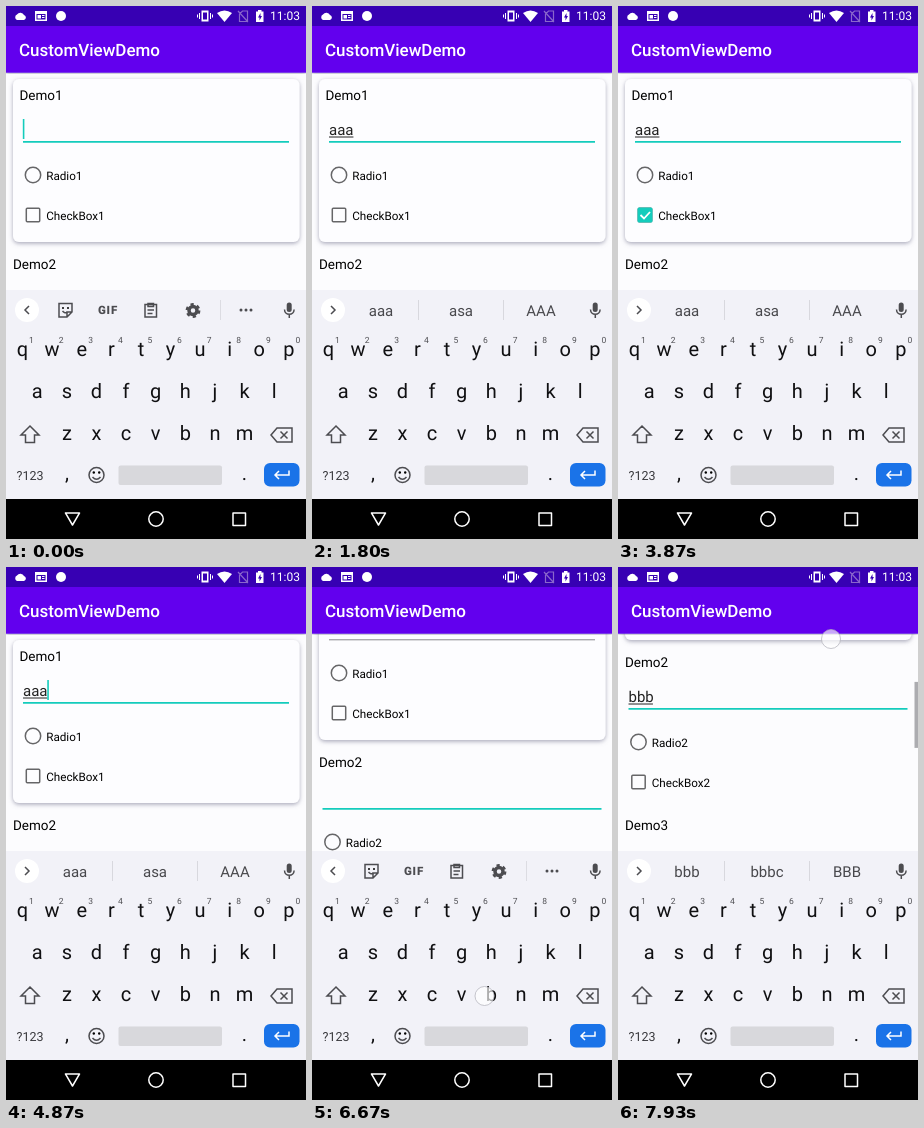
Recreate the animation shown at these times as an HTML page. Size 300 px wide and 533 px high, loop 8000 ms.

```html
<!DOCTYPE html>
<html lang="en">
<head>
<meta charset="utf-8">
<title>CustomViewDemo</title>
<style>
html, body { margin: 0; height: 100%; overflow: hidden; background: #fcfcfe; }
svg { display: block; width: 100vw; height: 100vh; font-family: Roboto, sans-serif; text-rendering: geometricPrecision; }
.mid { text-anchor: middle; }
.line { fill: none; stroke: #4c4c50; stroke-width: 1.5; }
.box { fill: none; stroke: #666668; stroke-width: 1.5; }
.nav { fill: none; stroke: #fff; stroke-width: 1.5; stroke-linejoin: round; }
.word { font-size: 15px; fill: #48484c; text-anchor: middle; }
.digit { font-size: 8.5px; fill: #505054; text-anchor: middle; }
.key { font-size: 20px; fill: #101012; text-anchor: middle; }
</style>
</head>
<body>
<svg viewBox="0 0 300 533">
  <defs>
    <filter id="shade" x="-10%" y="-10%" width="120%" height="125%">
      <feDropShadow dx="0" dy="1.5" stdDeviation="2.2" flood-color="#70708c" flood-opacity=".6"/>
    </filter>
  </defs>
  <rect width="300" height="533" fill="#fcfcfe"/>
  <g id="page"></g>

  <g id="bar">
    <rect y="62" width="300" height="4.5" fill="#6200ee" filter="url(#shade)"/>
    <rect y="20" width="300" height="46.5" fill="#6200ee"/>
    <rect width="300" height="20" fill="#3700b3"/>
    <text x="13" y="50" font-size="17" font-weight="500" fill="#fff">CustomViewDemo</text>
    <g fill="#fff">
      <path d="M11 14a3 3 0 0 1 0-5.500a4 4 0 0 1 7 .5a2.600 2.600 0 0 1 0 5z"/>
      <path fill-rule="evenodd" d="M29 5h12v10H29zM30.500 8v5.500h9V8zM31.500 9h3.500v3.500h-3.500zM36 9h2.500v1H36zM36 11h2.500v1H36z"/>
      <circle cx="55" cy="10" r="5"/>
      <path fill-rule="evenodd" d="M195.500 4.500h7v11h-7zM197 6.500v7h4v-7zM193 7h1v6h-1zM204 7h1v6h-1zM191 8.500h1v3h-1zM206 8.500h1v3h-1z"/>
      <path d="M211 7q7.500-5 15 0l-7.500 9z"/>
      <path d="M250 5.500h2V4h3.500v1.500h2V16h-7.500zM254.500 7l-2.500 4.500h1.500V14.500l2.500-4.500h-1.500z" fill-rule="evenodd"/>
    </g>
    <path d="M233.500 15.500V8l3-3h5v10.500zM232 5l10 11" fill="none" stroke="#8a66cc" stroke-width="1.200"/>
    <text x="264" y="14.300" font-size="12" fill="#fff">11:03</text>
  </g>

  <g id="keys"></g>
  <g id="strip"></g>
  <g id="popup"></g>
  <g>
    <rect y="493" width="300" height="40"/>
    <g class="nav">
      <path d="M59.500 507h14l-7 12z"/>
      <circle cx="150" cy="513" r="7.200"/>
      <rect x="227" y="507" width="12.500" height="12.500"/>
    </g>
  </g>
  <g id="touch"></g>
</svg>

<script>
const LOOP = 8000, TICK = 1000 / 15;
const $ = id => document.getElementById(id);
const clamp = v => Math.max(0, Math.min(1, v));
const ramp = (t, a, b) => clamp((t - a) / (b - a));
const during = (t, ...spans) => spans.some(([a, b]) => t >= a && t < b);
const text = (x, y, s, attr) => `<text x="${x}" y="${y}" ${attr}>${s}</text>`;

// Words offered after each typed letter
const words = {
  a: ['a', 'are', 'all'], aa: ['aa', 'as', 'AA'], aaa: ['aaa', 'asa', 'AAA'],
  b: ['b', 'be', 'but'], bb: ['bb', 'bbb', 'BB'], bbb: ['bbb', 'bbbc', 'BBB']
};
const typed = (t, letter, times) => letter.repeat(times.filter(at => t >= at).length);

function drawKeys() {
  const row = (s, x, y) => [...s].map((c, i) => text(x + i * 29.6, y, c, 'class="key"')).join('');
  const digits = [...'1234567890'].map((d, i) => text(25.5 + i * 29.6, 336.5, d, 'class="digit"')).join('');
  $('keys').innerHTML = `
    <rect y="284" width="300" height="209" fill="#f2f2f8"/>
    ${row('qwertyuiop', 16.5, 350)}${digits}
    ${row('asdfghjkl', 31.3, 391.5)}${row('zxcvbnm', 60.9, 434)}
    <path class="line" d="M24 420l9 9h-4.500v7.500h-9V429H15z"/>
    <path class="line" d="M265 429l6-7h15v14h-15zM274.500 425.500l7 7m0-7l-7 7"/>
    ${text(24, 473.5, '?123', 'class="mid" font-size="12.500" fill="#38383c"')}
    ${text(60.9, 474, ',', 'class="key"')}${text(238.5, 474, '.', 'class="key"')}
    <circle class="line" cx="90.500" cy="469" r="7.500"/>
    <path class="line" d="M86.500 471q4 4.500 8 0"/>
    <circle cx="87.800" cy="466.500" r="1.200"/><circle cx="93.200" cy="466.500" r="1.200"/>
    <rect x="112.500" y="459.500" width="103.500" height="19.500" rx="2" fill="#d8d8dc"/>
    <rect x="258" y="457" width="35.500" height="23.500" rx="6" fill="#1a73e8"/>
    <path d="M283 464.500v4.500h-14m4-4l-4 4l4 4" fill="none" stroke="#fff" stroke-width="1.500"/>`;
}

function strip(word) {
  const tools = `
    <path class="line" d="M53 297.500h13v8.500l-5 5H53zM61 311v-5h5M56.500 305q2.500 3 4.500 1"/>
    <circle cx="57" cy="302" r="1"/><circle cx="62" cy="302" r="1"/>
    ${text(102, 308, 'GIF', 'class="mid" font-size="11.500" font-weight="900" letter-spacing=".8" fill="#4c4c50"')}
    <path class="line" d="M139 298.500h11.500V311H139zM142 297.500h5.500v3H142zM141.500 304h6.500M141.500 307.500h5"/>
    <circle cx="187" cy="304.500" r="4" fill="none" stroke="#4c4c50" stroke-width="3.500"/>
    <circle cx="187" cy="304.500" r="6.300" fill="none" stroke="#4c4c50" stroke-width="2.200" stroke-dasharray="3.300"/>
    <path d="M214.500 294v20" stroke="#dcdce2"/>
    ${[235, 240, 245].map(x => `<circle cx="${x}" cy="304" r="1.500" fill="#4c4c50"/>`).join('')}`;
  const list = (words[word] || []).map((w, i) => text(69 + i * 80, 309.5, w, 'class="word"')).join('');
  return `
    <circle cx="21" cy="304" r="12" fill="#fff"/>
    <path class="line" d="${word ? 'M19 300l4 4l-4 4' : 'M23 300l-4 4l4 4'}"/>
    ${word ? list + '<path d="M106.500 294v20M191.500 294v20" stroke="#d8d8de"/>' : tools}
    <rect x="280.700" y="296.500" width="5" height="9.500" rx="2.500" fill="#4c4c50"/>
    <path class="line" d="M278.500 303.500a4.800 4.800 0 0 0 9.600 0M283.300 308.500v3.500"/>`;
}

function field(x, y, n, s) {
  const end = x + 3.5 + 8.15 * s.value.length;
  const under = s.composing && s.value
    ? `<path d="M${x + 3.5} ${y + 37}H${end}" stroke="#222" stroke-width="1"/>` : '';
  const caret = s.caret
    ? `<path d="M${end + .6} ${y + 19}v20" stroke="#14ccbc" stroke-width="1.600"/>` : '';
  const c = s.check || 0;
  return `
    ${text(x, y, 'Demo' + n, 'font-size="13.500"')}
    ${text(x + 3.5, y + 35, s.value, 'font-size="15" fill="#222"')}${under}${caret}
    <path d="M${x + 3.5} ${y + 41.8}H${300 - x - 3.5}" stroke="${s.focus ? '#14ccbc' : '#88888c'}" stroke-width="${s.focus ? 1.8 : 1}"/>
    <circle class="box" cx="${x + 13.5}" cy="${y + 75}" r="7.700"/>
    ${text(x + 26.7, y + 79.5, 'Radio' + n, 'font-size="11.700"')}
    <circle cx="${x + 13.5}" cy="${y + 115}" r="18" fill="#03dac5" opacity="${s.ripple || 0}"/>
    <rect class="box" x="${x + 6.8}" y="${y + 108.3}" width="13.400" height="13.400" rx="1"/>
    <g opacity="${c}">
      <rect x="${x + 6}" y="${y + 107.5}" width="15" height="15" rx="1.500" fill="#14ccbc"/>
      <path d="M${x + 9} ${y + 115}l3.500 3.500l6-6.500" fill="none" stroke="#fff" stroke-width="1.800" pathLength="1" stroke-dasharray="${c} 2"/>
    </g>
    ${text(x + 26.7, y + 119.5, 'CheckBox' + n, 'font-size="11.700"')}`;
}

function popup(letter, x, y) {
  return `<rect x="${x - 16.5}" y="${y - 70}" width="33" height="89" rx="3" fill="#ececf2" filter="url(#shade)"/>
    ${text(x, y - 42, letter, 'class="key" style="font-size:24px"')}
    ${letter == 'a' ? text(x + 8, y - 33, '...', 'class="mid" font-size="12"') : ''}`;
}

const finger = (x, y) => `<circle cx="${x}" cy="${y}" r="9.500" fill="#fff" fill-opacity=".65" stroke="#b0b0b8" stroke-opacity=".7" stroke-width="1"/>`;

const tapsA = [[800, 990], [1130, 1260], [1330, 1460]];
const tapsB = [[6660, 6790], [6860, 6990], [7060, 7190]];
const ripple = (t, a) => .16 * ramp(t, a, a + 130) * (1 - ramp(t, a + 200, a + 480));

function draw(t) {
  const first = typed(t, 'a', [990, 1260, 1460]);
  const second = typed(t, 'b', [6790, 6990, 7190]);
  const moved = t >= 5860;
  const drag1 = 1 - (1 - ramp(t, 5180, 5530)) ** 3;
  const drag2 = 1 - (1 - ramp(t, 7500, 7930)) ** 1.6;
  const scroll = 63 * drag1 + 100 * drag2;

  const one = field(13.5, 94, 1, {
    value: first, composing: !moved, focus: !moved,
    caret: during(t, [0, 330], [800, 1790], [2330, 2790], [3330, 3790], [4330, 4930]),
    check: ramp(t, 3450, 3720) * (1 - ramp(t, 4450, 4720)),
    ripple: ripple(t, 3330) + ripple(t, 4330)
  });
  const two = field(7, 263, 2, {
    value: second, composing: true, focus: moved,
    caret: during(t, [5860, 6260], [6790, 7660])
  });
  const thumb = ramp(t, 5180, 5260) * (1 - ramp(t, 5730, 6000)) + ramp(t, 7520, 7600);
  $('page').innerHTML = `<g transform="translate(0 ${-scroll})">
      <rect x="7" y="73" width="286.500" height="163" rx="6" fill="#fdfdff" filter="url(#shade)"/>
      ${one}${two}${text(7, 426, 'Demo3', 'font-size="13.500"')}
    </g>
    <rect x="296.500" y="${66 + scroll * .3}" width="3.500" height="66" fill="#acacb0" opacity="${thumb}"/>`;

  $('strip').innerHTML = strip(moved ? second : first);

  const pressA = during(t, ...tapsA), pressB = during(t, ...tapsB);
  $('popup').innerHTML = pressA ? popup('a', 31, 385)
    : pressB && t >= 6720 ? popup('b', 179.5, 428) : '';

  $('touch').innerHTML = pressA ? finger(31, 397)
    : pressB ? finger(172.5, 429)
    : during(t, [3330, 3460], [4330, 4460]) ? finger(177, 209)
    : during(t, [5190, 5460]) ? finger(201, 183 - scroll)
    : during(t, [5730, 5860]) ? finger(150, 228)
    : t >= 7520 ? finger(213, 235 - scroll) : '';
}

let last = -1;
function play() {
  const tick = Math.floor((performance.now() % LOOP + 4) / TICK) % 120;
  if (tick !== last) draw((last = tick) * TICK);
  requestAnimationFrame(play);
}
drawKeys();
play();
</script>
</body>
</html>
```
